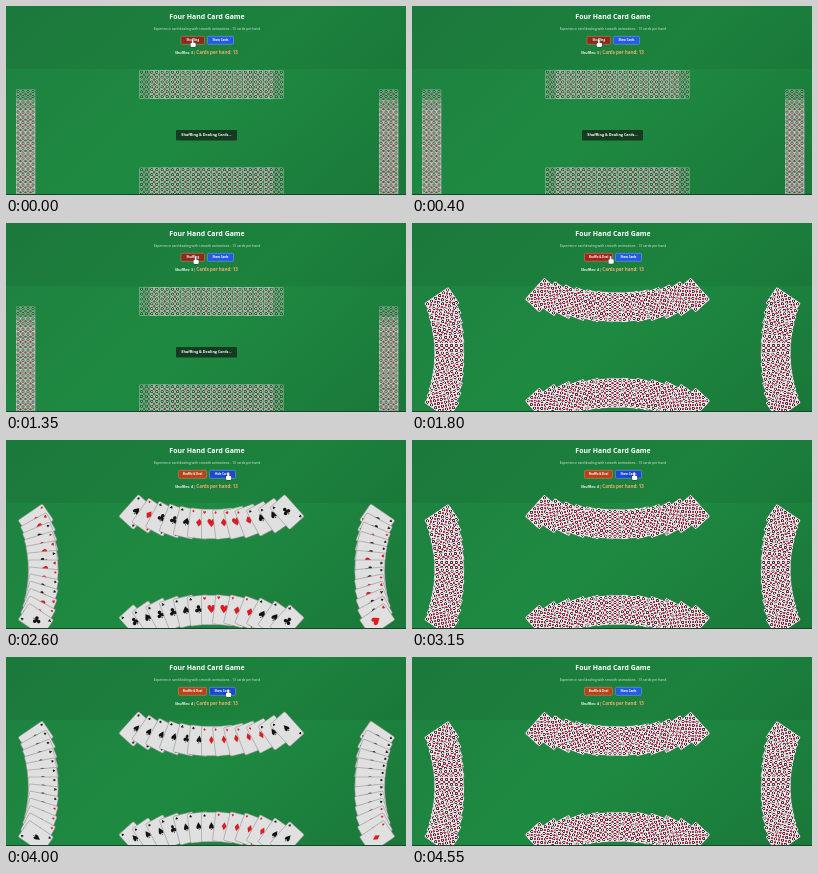
Recreate the animation shown at these times as an HTML page with a canvas. Size 400 by 189 pixels, loop 4600 ms.

```html
<!DOCTYPE html>
<html lang="en">
<head>
<meta charset="utf-8">
<title>Four Hand Card Game</title>
<style>
html, body { margin: 0; height: 100%; overflow: hidden; background: #1b7a39; }
canvas { display: block; width: 400px; height: 189px; }
</style>
</head>
<body>
<canvas id="stage"></canvas>
<script>
const LOOP = 4600, W = 400, H = 189, CARD_W = 20, CARD_H = 29.5;
const stage = document.getElementById('stage');
const dpr = window.devicePixelRatio || 1;
stage.width = W * dpr;
stage.height = H * dpr;
const ctx = stage.getContext('2d');

const ramp = (t, a, b) => {
  const u = Math.min(1, Math.max(0, (t - a) / (b - a)));
  return u * u * (3 - 2 * u);
};
const mix = (a, b, u) => a + (b - a) * u;

// Each hand: first card of the straight row, its step, and the fan pose for k = -6..6.
const hands = [
  { x: 143, y: 78.5, dx: 10.4, dy: 0, suits: ['♠♦♣♣♠♦♥♦♥♦♠♠♣', '♠♠♠♠♣♠♦♦♦♦♦♠♠'],
    fan: k => [205.5 + 12.6 * k, 84 - k * k / 3, -7 * k] },
  { x: 19.5, y: 98, dx: 0, dy: 10.4, suits: ['♦♥♠♦♥♣♥♦♠♣♥♦♣', '♠♠♠♣♠♠♠♣♠♦♦♦♠'],
    fan: k => [37 - k * k / 5, 130 + 8.3 * k, 90 + 5.7 * k] },
  { x: 382.5, y: 98, dx: 0, dy: 10.4, suits: ['♠♣♦♠♠♥♣♠♦♥♣♠♥', '♠♠♣♠♠♠♠♣♠♠♦♦♦'],
    fan: k => [364 + k * k / 5, 130 + 8.3 * k, -90 - 5.7 * k] },
  { x: 143, y: 176, dx: 10.4, dy: 0, suits: ['♣♠♣♣♠♣♥♥♦♦♠♠♣', '♠♠♠♣♠♠♠♦♦♦♦♠♠'],
    fan: k => [205.5 + 12.6 * k, 170 + k * k / 3, 7 * k] }
];

function box(c, x, y, w, h, r, fill, line) {
  c.beginPath();
  c.roundRect(x, y, w, h, r);
  c.fillStyle = fill;
  c.fill();
  if (line) {
    c.strokeStyle = line;
    c.lineWidth = .5;
    c.stroke();
  }
}

function dot(c, x, y, r, fill) {
  c.beginPath();
  c.arc(x, y, r, 0, 7);
  c.fillStyle = fill;
  c.fill();
}

function label(text, x, y, size, color = '#fff', weight = 700, align = 'center') {
  ctx.font = `${weight} ${size}px "Open Sans", sans-serif`;
  ctx.textAlign = align;
  ctx.textBaseline = 'middle';
  ctx.fillStyle = color;
  ctx.fillText(text, x, y);
}

function makeBack() {
  const back = document.createElement('canvas'), zoom = 4;
  back.width = CARD_W * zoom;
  back.height = CARD_H * zoom;
  const c = back.getContext('2d');
  c.scale(zoom, zoom);
  box(c, 0, 0, CARD_W, CARD_H, 1.5, '#efe4e7', '#888');
  for (let row = 0; row < 6; row++) {
    for (let col = 0; col < 4; col++) {
      const x = 2.5 + col * 5, y = 2.45 + row * 4.9;
      dot(c, x, y, 1.55, '#3f262c');
      dot(c, x, y, .75, '#f6eeee');
      if (col < 3 && row < 5) dot(c, x + 2.5, y + 2.45, 1.2, '#b83050');
    }
  }
  return back;
}
const back = makeBack();

function drawFace(suit, pipWidth) {
  box(ctx, -CARD_W / 2, -CARD_H / 2, CARD_W, CARD_H, 1.5, '#dfe0df', '#888');
  ctx.fillStyle = '♦♥'.includes(suit) ? '#dc1c22' : '#111';
  ctx.textAlign = 'center';
  ctx.textBaseline = 'middle';
  const pip = (x, y, size) => {
    ctx.font = `${size}px "DejaVu Sans", sans-serif`;
    ctx.fillText(suit, x, y);
  };
  ctx.save();
  ctx.scale(pipWidth, 1);
  pip(0, 0, 11);
  ctx.restore();
  for (let end = 0; end < 2; end++) {
    pip(-7, -11.5, 4);
    ctx.rotate(Math.PI);
  }
}

function drawHand(hand, spread, turn, deal) {
  for (let i = 0; i < 13; i++) {
    const [x, y, angle] = hand.fan(i - 6);
    ctx.save();
    ctx.globalAlpha = mix(.36, 1, spread);
    ctx.translate(mix(hand.x + i * hand.dx, x, spread), mix(hand.y + i * hand.dy, y, spread));
    ctx.rotate(angle * spread * Math.PI / 180);
    ctx.scale(Math.max(.05, Math.abs(Math.cos(turn * Math.PI))), 1);
    if (turn > .5) drawFace(hand.suits[deal][i], deal ? .75 : 1);
    else ctx.drawImage(back, -CARD_W / 2, -CARD_H / 2, CARD_W, CARD_H);
    ctx.restore();
  }
}

function drawTable() {
  const felt = ctx.createLinearGradient(60, -60, 340, 250);
  felt.addColorStop(0, '#1e8040');
  felt.addColorStop(.5, '#1e8a41');
  felt.addColorStop(1, '#1a7739');
  ctx.fillStyle = felt;
  ctx.fillRect(0, 0, W, H);
  ctx.fillStyle = 'rgba(0,0,0,.06)';
  ctx.fillRect(0, 0, W, 63);
}

function drawHeader(t, busy) {
  label('Four Hand Card Game', 201, 11.2, 6.9);
  label('Experience card dealing with smooth animations - 13 cards per hand', 201, 22.7, 3.35, '#d9eadd', 400);

  const overShow = t > 2050 && t < 4350, open = t > 2300 && t < 2950 || t > 3600 && t < 3980;
  const [x, w, showX] = busy ? [175, 23.5, 201.5] : [172.5, 28, 203.5];
  const red = busy ? '#8c2a1b' : t < 2000 ? '#a5231c' : '#b8421a';
  box(ctx, x, 30.3, w, 8, 1, red, '#d08a68');
  label(busy ? 'Shuffling' : 'Shuffle & Deal', x + w / 2, 34.3, 2.8);
  box(ctx, showX, 30.3, 26, 8, 1, overShow ? '#1c48cf' : '#235be4', '#7fa5f0');
  label(open ? 'Hide Cards' : 'Show Cards', showX + 13, 34.3, 2.8);

  label(`Shuffles: ${t < 1500 ? 3 : 4}`, 169, 47, 3.5, '#f4f8f4', 700, 'left');
  label('|', 188.3, 46.8, 4.2, '#f0ad72', 700);
  label('Cards per hand: 13', 190.3, 46.8, 4.5, '#f0ad72', 700, 'left');
}

function drawPointer(t) {
  if (t > 4350) return;
  const x = mix(mix(187, 190, ramp(t, 300, 900)), 199, ramp(t, 1600, 1800));
  ctx.save();
  ctx.translate(mix(x, 222.5, ramp(t, 1850, 2150)), mix(37, 36, ramp(t, 1700, 2000)));
  ctx.scale(1.25, 1.25);
  ctx.fillStyle = '#fff';
  ctx.strokeStyle = '#222';
  ctx.lineWidth = .5;
  ctx.beginPath();
  ctx.roundRect(-1, -3, 1.3, 4, .6);
  ctx.roundRect(-2, -.3, 4.2, 3.5, 1);
  ctx.stroke();
  ctx.fill();
  ctx.restore();
}

function draw(t) {
  const busy = t < 600 || t > 1080 && t < 1600;
  const spread = t < 1050 ? ramp(t, 500, 800)
    : 1 - ramp(t, 1080, 1200) + ramp(t, 1500, 1700);
  const turn = ramp(t, 2300, 2500) - ramp(t, 2950, 3120)
    + ramp(t, 3600, 3800) - ramp(t, 4020, 4200);

  ctx.setTransform(dpr, 0, 0, dpr, 0, 0);
  drawTable();
  for (const hand of hands) drawHand(hand, spread, turn, t < 3400 ? 0 : 1);
  drawHeader(t, busy);
  if (busy) {
    box(ctx, 170, 124, 61, 10.5, 1, 'rgba(20,48,30,.88)');
    label('Shuffling & Dealing Cards...', 200.5, 129.2, 3.75);
  }
  drawPointer(t);
  ctx.fillStyle = '#17452a';
  ctx.fillRect(0, H - 1, W, 1);
}

function tick() {
  draw(performance.now() % LOOP);
  requestAnimationFrame(tick);
}
tick();
</script>
</body>
</html>
```
